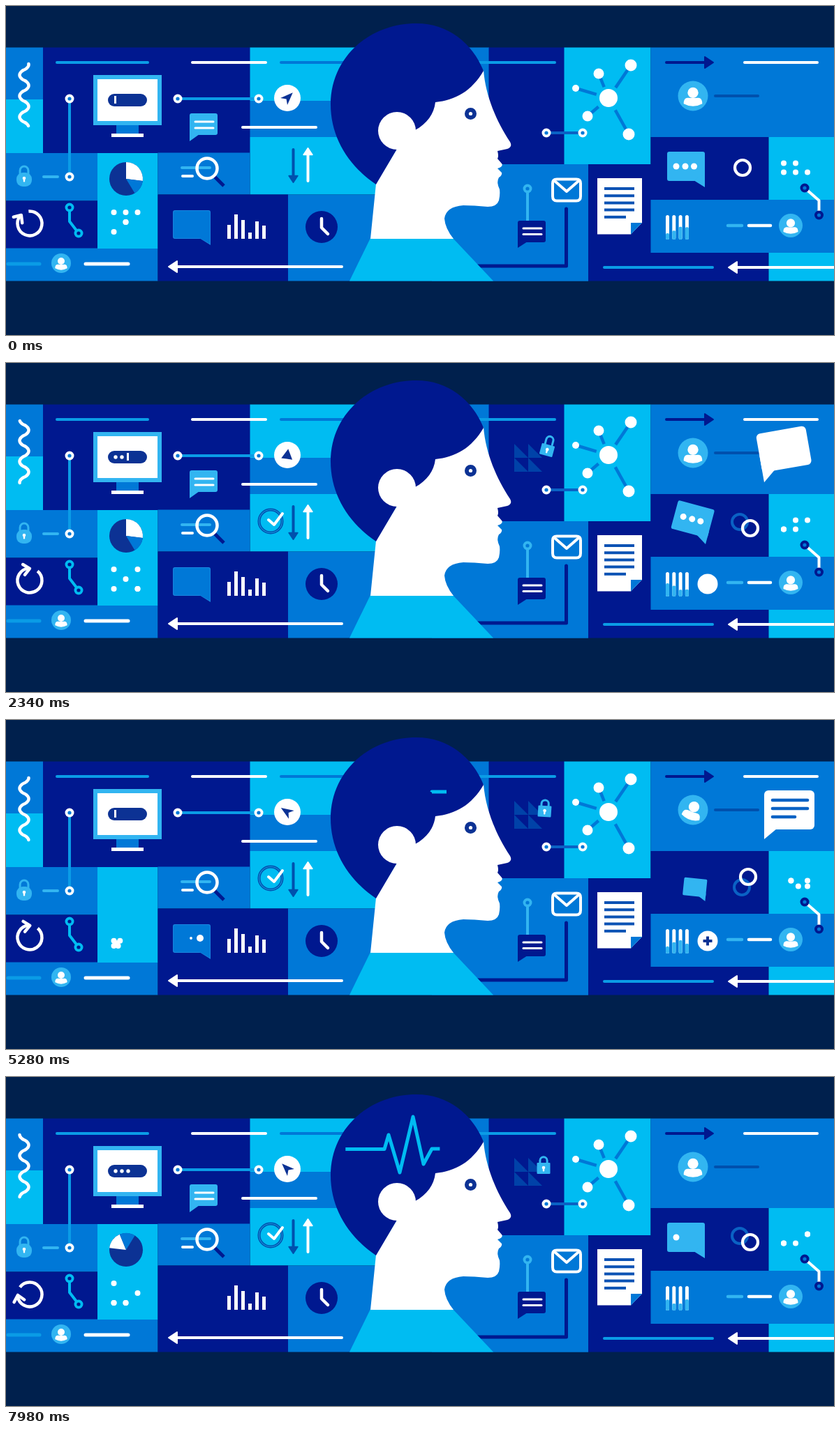
Animation of 1186x472 px, one loop 8000 ms. Source, as an HTML page:

```html
<!DOCTYPE html>
<html lang="en">
<head>
<meta charset="utf-8">
<title>Thinking head</title>
<style>
html, body { margin: 0; width: 100%; height: 100%; overflow: hidden; background: #00204d; }
svg { display: block; width: 1186px; height: 472px; }
</style>
</head>
<body>
<svg viewBox="0 0 1186 472" stroke-linecap="round" stroke-linejoin="round">
  <g id="scene"></g>
  <g id="live"></g>
</svg>
<script>
const NIGHT = '#00204d', NAVY = '#00188f', INK = '#0c3294', DEEP = '#0050ad', MID = '#0a62c4';
const BLUE = '#0078d7', AZURE = '#0a9ce6', CYAN = '#00bcf2', SKY = '#32b5f1', WHITE = '#fff';
const LOOP = 8000, STEP = 60;
const BUTT = 'stroke-linecap="butt"';

// Shapes
const rect = (c, x, y, w, h, rx = 0) =>
  `<rect x="${x}" y="${y}" width="${w}" height="${h}" rx="${rx}" fill="${c}"/>`;
const tile = (c, x1, y1, x2, y2) => rect(c, x1, y1, x2 - x1, y2 - y1);
const disc = (c, x, y, r) => `<circle cx="${x}" cy="${y}" r="${Math.max(0, r)}" fill="${c}"/>`;
const ring = (c, x, y, r, w) =>
  `<circle cx="${x}" cy="${y}" r="${r}" fill="none" stroke="${c}" stroke-width="${w}"/>`;
const fill = (c, d) => `<path d="${d}" fill="${c}"/>`;
const line = (c, d, w = 4, extra = '') =>
  `<path d="${d}" fill="none" stroke="${c}" stroke-width="${w}" ${extra}/>`;
const row = (c, x1, x2, y, w = 4) => line(c, `M${x1} ${y}H${x2}`, w);
const node = (c, hole, x, y) => disc(c, x, y, 6.5) + disc(hole, x, y, 2.6);
const place = (content, x, y, angle = 0, scale = 1) => scale < 0.01 ? '' :
  `<g transform="translate(${x} ${y}) rotate(${angle}) scale(${scale})">${content}</g>`;
const arrowhead = (c, x, y, angle, scale = 1) => place(
  `<path d="M1 0L13 -8V8Z" fill="${c}" stroke="${c}" stroke-width="2"/>`, x, y, angle, scale);

function bubble(c, x, y, w, h, tail, right) {
  const b = y + h, e = x + w;
  return rect(c, x, y, w, h, 3) + fill(c, right
    ? `M${e - 16} ${b - 1}L${e} ${b + tail}V${b - 10}Z`
    : `M${x + 14} ${b - 1}L${x} ${b + tail}V${b - 10}Z`);
}
function padlock(x, y, w, h, rx, lift) {
  const arm = w * 0.27;
  return line(SKY, `M${-arm} ${y + 3}V${y - 3 - lift}A${arm} ${arm} 0 0 1 ${arm} ${y - 3 - lift}V${y + 3 - lift}`, 3)
    + rect(SKY, x, y, w, h, rx) + disc(WHITE, 0, -1, 2.3) + rect(WHITE, -1.2, -1, 2.4, 5.5, 1);
}
function person(x, y, r, angle = 0) {
  const body = disc(WHITE, 0, -4.5, 7.5) + fill(WHITE, 'M-13 11C-13 0 -6 3 0 3S13 0 13 11Q0 18 -13 11Z');
  return disc(SKY, x, y, r) + place(body, x, y, angle, r / 21);
}
function wedge(c, x, y, r, from, size) {
  if (size < 0.5 || r < 0.5) return '';
  const at = a => `${x + r * Math.cos(a * Math.PI / 180)} ${y + r * Math.sin(a * Math.PI / 180)}`;
  return fill(c, `M${x} ${y}L${at(from)}A${r} ${r} 0 0 1 ${at(from + size)}Z`);
}

// Timing
const clamp = v => Math.max(0, Math.min(1, v));
const ease = v => (v = clamp(v), v < 0.5 ? 2 * v * v : 1 - 2 * (1 - v) * (1 - v));
const after = (t, start, length = 500) => ease((t - start) / length);
const during = (t, start, end) => after(t, start) - after(t, end);

function tiles() {
  const top = 59.5, bottom = 394.5;
  return rect(NIGHT, 0, 0, 1186, 472)
    + tile(BLUE, 0, top, 53, 134) + tile(CYAN, 0, 134, 53, 211)
    + tile(NAVY, 53, top, 350, 211) + tile(CYAN, 349.5, top, 560, 136)
    + tile(BLUE, 349.5, 136, 560, 188) + tile(CYAN, 349.5, 188, 560, 270.5)
    + tile(BLUE, 0, 211, 131, 279.5) + tile(NAVY, 0, 279.5, 131, 348)
    + tile(BLUE, 0, 347.5, 217.5, bottom) + tile(CYAN, 131, 211, 217.5, 348)
    + tile(BLUE, 217.5, 210.5, 349.5, 270.5) + tile(NAVY, 217.5, 270.5, 404, bottom)
    + tile(BLUE, 404, 270.5, 834, bottom) + tile(BLUE, 620, top, 692, 150)
    + tile(NAVY, 691.5, top, 800, 227) + tile(BLUE, 610, 227, 834, bottom)
    + tile(CYAN, 799.5, top, 923.5, 227) + tile(BLUE, 923.5, top, 1186, 188)
    + tile(NAVY, 834, 227, 1092.5, bottom) + tile(NAVY, 923.5, 188, 1092.5, 278)
    + tile(CYAN, 1092.5, 188, 1186, 278) + tile(BLUE, 923.5, 278, 1186, 354)
    + tile(CYAN, 1092.5, 354, 1186, bottom);
}

function leftIcons() {
  let out = row(AZURE, 73, 203, 81) + row(WHITE, 267, 372, 81) + row(BLUE, 394, 520, 81)
    + row(WHITE, 339, 444, 174)
    + line(AZURE, 'M91 133V245') + node(WHITE, BLUE, 91, 133) + node(WHITE, BLUE, 91, 245)
    + row(AZURE, 246, 362, 133) + node(WHITE, BLUE, 246, 133) + node(WHITE, BLUE, 362, 133)
    // monitor
    + rect(SKY, 125, 99, 98, 72) + rect(WHITE, 131, 105, 86, 60) + rect(BLUE, 158, 171, 32, 12)
    + rect(WHITE, 151, 183, 46, 5) + rect(INK, 146, 126, 56, 18, 9)
    + row(SKY, 54, 74, 245)
    + line(CYAN, 'M91 289V309L104 326') + node(CYAN, NAVY, 91, 289) + node(CYAN, NAVY, 104, 326)
    + row(AZURE, 3, 48, 370, 5) + person(79, 369, 14) + row(WHITE, 114, 175, 370, 5)
    // magnifier
    + row(SKY, 252, 292, 232) + row(WHITE, 253, 267, 244)
    + line(NAVY, 'M299 245L312 258', 5, BUTT) + ring(WHITE, 288, 233, 14.5, 4.5)
    // clock
    + disc(NAVY, 452, 317, 23) + line(WHITE, 'M452 305V318L461 327', 4.5)
    // arrows
    + line(DEEP, 'M411.500 206V247') + arrowhead(DEEP, 411.5, 254, -90, 0.8)
    + line(WHITE, 'M432.500 212V251') + arrowhead(WHITE, 432.5, 203, 90, 0.8)
    + row(WHITE, 240, 481, 374) + arrowhead(WHITE, 232, 374, 0);
  [20, 35, 27, 9, 25, 19].forEach((h, i) => out += rect(WHITE, 317 + i * 10, 334 - h, 5, h));
  return out;
}

function molecule(x, y) {
  const atom = (dx, dy, r, gap) => {
    const k = gap / Math.hypot(dx, dy);
    return line(BLUE, `M${x + dx * k} ${y + dy * k}L${x + dx} ${y + dy}`, 4.5, BUTT) + disc(WHITE, x + dx, y + dy, r);
  };
  return disc(WHITE, x, y, 13) + atom(32, -47, 8.5, 18) + atom(-14, -35, 7.5, 17)
    + atom(-47, -14, 5, 18) + atom(-30, 26, 7.5, 19) + atom(29, 52, 8.5, 20);
}

function rightIcons() {
  let out = row(AZURE, 660, 786, 81)
    + row(MID, 774, 826, 182) + node(WHITE, BLUE, 774, 182) + node(WHITE, BLUE, 826, 182)
    + molecule(863, 132)
    + row(NAVY, 946, 1003, 81) + arrowhead(NAVY, 1014, 81, 180)
    + row(WHITE, 1058, 1162, 81) + row(DEEP, 1016, 1077, 129)
    // envelope and its wire
    + line(NAVY, 'M802.500 291V373H660', 5)
    + line(WHITE, 'M789 248.500H817Q823 248.500 823 254.500V273Q823 279.500 817 279.500H789Q783 279.500 783 273V254.500Q783 248.500 789 248.500Z')
    + line(WHITE, 'M787 252L803 266L819 252')
    // pinned note
    + line(SKY, 'M747 264V309') + node(SKY, BLUE, 747, 262)
    + bubble(NAVY, 733, 308, 40, 31, 8) + row(WHITE, 741, 767, 319, 3) + row(WHITE, 741, 767, 327.5, 3)
    // document
    + fill(WHITE, 'M847 247H911V311L895 327.500H847Z') + fill(BLUE, 'M911 311H895V327.500Z')
    + row(AZURE, 857, 1012, 375)
    + row(WHITE, 1042, 1186, 375) + arrowhead(WHITE, 1034, 375, 0)
    + row(SKY, 1034, 1054, 315, 4.5) + row(WHITE, 1064, 1095, 315, 4.5) + person(1124, 315, 17)
    + line(WHITE, 'M1144 261L1164.500 279V300')
    + node(NAVY, BLUE, 1144, 261) + node(NAVY, BLUE, 1164.5, 300);
  for (let i = 0; i < 5; i++)
    out += line('#0a52b4', `M857 ${262 + i * 10.2}H${i < 4 ? 900 : 888}`, 4, BUTT);
  return out;
}

function head() {
  return fill(CYAN, 'M522 333H640L698 394.500H492Z')
    + fill(WHITE, 'M684 92C687 130 703 166 722 195Q726 202 718 205L704 208Q706 216 704 219'
      + 'L710 226Q713 230 704 233L710 239Q711 243 706 246Q702 253 707 263Q708 270 706 279'
      + 'Q703 288 690 288Q670 286 655 286Q630 288 628 305Q629 319 641 334H522'
      + 'L530 255L560 205L580 130Z')
    + fill(NAVY, 'M530 256C489 228 465 187 465 141C465 76 518 25 588 25C633 25 668 53 684 93'
      + 'C667 122 644 135 615 138C613 155 603 169 586 178L560 205Z')
    + disc(WHITE, 560, 179, 27) + disc(INK, 665.5, 154.5, 8.5) + disc(WHITE, 665.5, 154.5, 2.6);
}

function pulse(t) {
  let out = '';
  for (const start of [0, 3760, 7075]) {
    const p = t - start, from = 345 * after(p, 780, 900), to = 345 * after(p, 270, 720);
    if (to - from > 1) out += line(CYAN,
      'M473 103.500H542L548 83L564 137L583 57L598 125L610 103H631', 5,
      `pathLength="345" stroke-dasharray="0 ${from} ${to - from} 999" ${BUTT}`);
  }
  return out;
}

function squiggle(t) {
  const shift = Math.PI / 2 * (1 - Math.cos(2 * Math.PI * (t - 420) / 4900));
  let d = '';
  for (let y = 83; y <= 172; y++) {
    const c = Math.cos((y - 83) * Math.PI / 15 - shift);
    d += `${d ? 'L' : 'M'}${(26 + 6.5 * Math.sign(c) * Math.abs(c) ** 0.75).toFixed(2)} ${y}`;
  }
  return line(WHITE, d, 4.5);
}

function typing(t) {
  const p = t % 6060;
  const count = Math.min(3, Math.floor(p / 270)) - (p > 2000) - 2 * (p > 5200);
  let out = '';
  for (let i = 0; i < count; i++) out += disc(WHITE, 157 + i * 9, 135, 2.7);
  return out + (t % 1000 < 900 ? rect(WHITE, 155 + count * 9, 129, 3, 11) : '');
}

function pointer(t) {
  const lean = during(t, 1300, 3900);
  const angle = 45 - 90 * after(t, 250) + 53 * lean - 45 * during(t, 5100, 6700);
  const half = 7 + 3 * lean;
  const arrow = fill(INK, `M0 -11L${half} 7L0 ${2 + 5 * lean}L${-half} 7Z`);
  return disc(WHITE, 403, 132, 19) + place(arrow, 403, 132, angle, 1 - 0.2 * lean);
}

// Spins away, then grows back as its slices fan out.
function pie(t) {
  const grow = clamp((t - 5700) / 2300), back = t > 5400;
  const r = 24 * (1 - after(t, 4560) + after(t, 5700, 600));
  const from = back ? 248 * grow - 59 : -90 - 160 * after(t, 4300, 900);
  const white = back ? 31 + 30 * grow : 97, blue = back ? 54 * after(t, 6100, 1000) : 52;
  return disc(INK, 172, 248, r) + wedge(WHITE, 172, 248, r, from, white)
    + wedge(BLUE, 172, 248, r, from + white, blue);
}

function refresh(t) {
  const turn = -142 + 45 * during(t, 1300, 3800) - 16 * during(t, 3900, 4700) + 312 * after(t, 4600, 2500);
  return place(line(WHITE, 'M12 12.700A17.500 17.500 0 1 1 17.500 0', 4.5, BUTT)
    + line(WHITE, 'M9 -6L17 2L24 -7', 4.5), 34, 312, turn);
}

// Dots slide over a grid of columns and rows.
const gridDots = (dots, x, y, dx, dy) =>
  dots.map(([col, level]) => disc(WHITE, x + dx * col, y + dy * level, 4)).join('');

function dice(t) {
  const gather = during(t, 3900, 5100), spread = after(t, 200), slide = after(t, 1300);
  const back = after(t, 5000), late = after(t, 6800);
  const dots = [
    [0, 0], [0, 2], [2, late],
    [1 + spread - 2 * back, 1 + spread - back + late],
    [1, 1 + during(t, 200, 1300) + late],
    [1 + slide - back, 2 * slide],
  ].map(([col, level]) => [col * (1 - gather), level + (2 - level) * gather]);
  return gridDots(dots, 154.5, 296, 17, 14);
}

function shuffle(t) {
  const drop = during(t, 2700, 5000), cross = during(t, 5000, 6800), slide = after(t, 1300);
  return gridDots([
    [2 * cross, slide], [1 - drop + after(t, 6800), drop], [cross, 1 - cross],
    [1 + during(t, 2700, 6800), 1], [2, 1 - slide + drop],
  ], 1114, 225.5, 17, 13);
}

function leftLive(t) {
  const open = during(t, 5300, 6700), away = during(t, 4450, 6900);
  const note = bubble(SKY, -2, -36, 40, 31, 9) + row(WHITE, 6, 32, -24, 3) + row(WHITE, 6, 32, -15, 3);
  const tick = ring(DEEP, 0, 0, 16.5, 4) + ring('#1693dc', 0, 0, 16.5, 1.2) + line(WHITE, 'M-3 -2L5 5L17 -11');
  const chat = bubble('#1884de', -54, -50, 54, 41, 9, true) + bubble(BLUE, -53, -49, 52, 39, 8, true);
  const dot = (x, start, end) => disc(WHITE, x, 313, 5 * during(t, start, end));
  return squiggle(t) + typing(t) + pointer(t) + pie(t) + refresh(t) + dice(t)
    + place(padlock(-11, -9, 22, 20, 9, 4 * open), 26 + 6 * open, 248 - 8 * open, 15 * open)
    + place(note, 265, 190, 3 * during(t, 3900, 5000), 1 - away)
    + place(tick, 379, 227, 0, after(t, 250))
    + place(chat, 293, 343, 0, 1 - after(t, 7000))
    + dot(252, 300, 1400) + dot(265, 3900, 5000) + dot(278, 3900, 6500);
}

function speech(t) {
  const text = during(t, 2700, 6800);
  const words = (y, w) => text < 0.01 ? '' : row(MID, 11, 11 + w * text, y, 4.6);
  return place(rect(WHITE, -1, -70, 72, 56, 6) + fill(WHITE, 'M-1 -40V0L17 -15Z')
    + words(-56, 50) + words(-44, 50) + words(-32, 32),
    1087, 171, -10 * (1 - after(t, 2700)), during(t, 1500, 7000));
}

function chatBubble(t) {
  const many = 1 - after(t, 2700), first = many + after(t, 6800);
  return place(bubble(SKY, -54, -51, 54, 42, 9, true) + disc(WHITE, -41, -30, 4.5 * first)
    + disc(WHITE, -28, -30, 4.5 * many) + disc(WHITE, -15.5, -30, 4.5 * many),
    1001 + during(t, 1400, 5000), 260, 15 * during(t, 1400, 5000), 1 - during(t, 2700, 5000));
}

function linkedRings(t) {
  const part = after(t, 1400), swing = during(t, 2800, 6800);
  return (part > 0 ? ring(MID, 1055 - 4 * part + 3 * swing, 232 - 4 * part + 12 * swing, 11, 4) : '')
    + ring(WHITE, 1055 + 11 * part - 3 * swing, 232 + 5 * part - 12 * swing, 11, 4.2);
}

function meters(t) {
  let out = '';
  for (let i = 0; i < 4; i++) {
    const x = 945 + i * 9.3, top = 321 + 5 * Math.cos(t / 750 + i * 1.3);
    out += rect(WHITE, x, 300, 5, 35, 2.5) + rect(SKY, x, top, 5, 335 - top, 2);
  }
  return out;
}

function rightLive(t) {
  const shown = after(t, 1500), settle = after(t, 2900), upright = after(t, 5100), cross = 6.5 * after(t, 2700);
  let flags = '';
  for (const x of [0, 20]) for (const y of [0, 20]) flags += fill('#0042a8', `M${x} ${y}l20 20h-20Z`);
  const plus = cross ? line(INK, `M${-cross} 0H${cross}M0 ${-cross}V${cross}`, 4, BUTT) : '';
  return place(flags, 728, 116, 0, shown)
    + place(padlock(-9.5, -8, 19, 16, 1, 4 * (1 - settle)), 775 - 3 * settle - 2 * upright, 125 + 6 * settle,
      15 - 10 * settle - 5 * upright, shown)
    + person(984, 129, 21.5, 15 * during(t, 2800, 6800) + 10 * during(t, 3900, 5000))
    + speech(t) + chatBubble(t) + linkedRings(t) + shuffle(t) + meters(t)
    + place(disc(WHITE, 0, 0, 14.5) + plus, 1005, 317, 0, during(t, 1500, 7000));
}

const live = document.getElementById('live');
document.getElementById('scene').innerHTML = tiles() + leftIcons() + rightIcons() + head();

const begin = performance.now();
function frame(now) {
  const t = Math.floor(Math.max(0, now - begin) % LOOP / STEP) * STEP;
  live.innerHTML = leftLive(t) + rightLive(t) + pulse(t);
  requestAnimationFrame(frame);
}
frame(begin);
</script>
</body>
</html>
```
